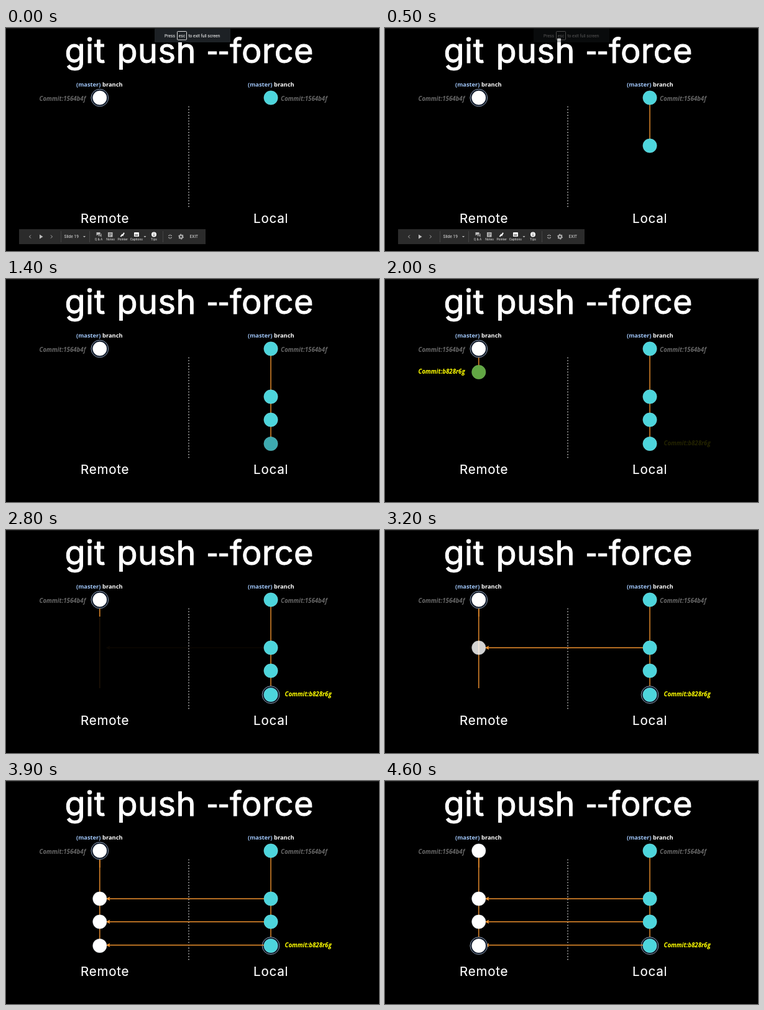
An HTML page for the animation above (4.8 s loop, 600x358 px).

```html
<!DOCTYPE html>
<html lang="en">
<head>
<meta charset="utf-8">
<title>git push --force</title>
<style>
  html, body { margin: 0; width: 100%; height: 100%; overflow: hidden; background: #000; }
  svg { display: block; width: 600px; height: 358px; }
  .title { font: 400 54px Inter, sans-serif; letter-spacing: .5px; fill: #fff; stroke: #fff; stroke-width: 1; stroke-linejoin: round; }
  .side { font: 400 20.5px Inter, sans-serif; letter-spacing: .8px; fill: #fff; stroke: #fff; stroke-width: .2; stroke-linejoin: round; }
  .branch { font: 700 9.3px "Open Sans", sans-serif; fill: #fff; }
  .commit { font: italic 700 9.7px "Open Sans", sans-serif; fill: #666; }
  .new { fill: #ff0; }
  .blue { fill: #9fc5f8; }
  .link { stroke: #f0922e; stroke-width: 1.4; fill: none; }
  .head { fill: #f0922e; }
  .local { fill: #4dd5dc; stroke: #8fdfe4; stroke-width: .4; }
  .remote { fill: #fff; stroke: #c8ccd2; stroke-width: .4; }
  .ring { fill: #0a1322; stroke: #8c9bb0; stroke-width: 1; }
  .tip { font: 6.7px Roboto, sans-serif; fill: #fff; }
  .bar { font: 6.6px Roboto, sans-serif; fill: #ddd; }
  .small { font-size: 5.1px; text-anchor: middle; }
  .icon { fill: #bbb; }
  .thin { fill: none; stroke: #aaa; stroke-width: 1; }
</style>
</head>
<body>
<svg viewBox="0 0 600 358">
  <defs>
    <circle id="dot" r="11.200"/>
    <circle id="halo" r="13.900" class="ring"/>
    <g id="arrow">
      <path class="link" d="M415 0H165"/>
      <path class="head" d="M160.500 0l7-3.200-1.500 3.200 1.500 3.200z"/>
    </g>
  </defs>
  <path d="M0 .5H600" stroke="#1c1c1c"/>

  <g class="title">
    <text x="94.500" y="56">git</text>
    <text x="178.500" y="56">push</text>
    <text x="322" y="56" font-family="Lato, sans-serif" letter-spacing="-2">--</text>
    <text x="360" y="56">force</text>
  </g>
  <g class="side">
    <text x="120" y="313">Remote</text>
    <text x="398" y="313">Local</text>
  </g>
  <g class="branch">
    <text x="113" y="93.500" class="blue">(master)</text><text x="155" y="93.500">branch</text>
    <text x="389" y="93.500" class="blue">(master)</text><text x="431" y="93.500">branch</text>
  </g>
  <g class="commit">
    <text x="53.500" y="117">Commit:1564b4f</text>
    <text x="442" y="117">Commit:1564b4f</text>
    <text x="53.500" y="152.300" class="new" data-in="1600 250" data-out="2450 250">Commit:b828r6g</text>
    <text x="448.500" y="267.300" class="new" data-in="1960 300">Commit:b828r6g</text>
  </g>
  <path d="M294 126.500V287" stroke="#ccc" stroke-width="1.700" stroke-linecap="round" stroke-dasharray="0 4.570"/>

  <!-- local history -->
  <g class="link">
    <path d="M426 123V178" data-in="50 250"/>
    <path d="M426 200V215" data-in="500 200"/>
    <path d="M426 237V254" data-in="1000 200"/>
  </g>
  <use href="#halo" x="426" y="264.500" data-in="2180 250"/>
  <g class="local">
    <use href="#dot" x="426" y="112"/>
    <use href="#dot" x="426" y="189" data-in="250 250"/>
    <use href="#dot" x="426" y="226" data-in="770 300"/>
    <use href="#dot" x="426" y="264.500" data-in="1200 250"/>
  </g>

  <!-- remote history -->
  <g class="link">
    <path d="M150.800 123V139" data-in="1400 200"/>
    <path d="M150.800 123V254" data-in="2770 220"/>
  </g>
  <use href="#arrow" y="189" data-in="2790 210"/>
  <use href="#arrow" y="226" data-in="3250 200"/>
  <use href="#arrow" y="263.500" data-in="3450 200"/>
  <use href="#halo" x="150.800" y="112" data-out="4250 250"/>
  <use href="#halo" x="150.800" y="264.500" data-in="4250 250"/>
  <use href="#dot" x="150.800" y="149.500" fill="#62a744" stroke="#83bd69" stroke-width=".4" data-in="1500 250" data-out="2450 250"/>
  <g class="remote">
    <use href="#dot" x="150.800" y="112"/>
    <use href="#dot" x="150.800" y="189" data-in="2960 290"/>
    <use href="#dot" x="150.800" y="226" data-in="3350 250"/>
    <use href="#dot" x="150.800" y="264.500" data-in="3620 250"/>
  </g>

  <!-- full screen hint -->
  <g class="tip" data-out="300 300">
    <rect x="239" y="1" width="122" height="22" rx="1" fill="#1d2125"/>
    <text x="255" y="14.500">Press</text>
    <rect x="275.500" y="5.500" width="15" height="13.500" rx="1" fill="none" stroke="#ddd"/>
    <text x="283" y="14.500" text-anchor="middle">esc</text>
    <text x="293.500" y="14.500">to exit full screen</text>
  </g>

  <!-- presenter toolbar -->
  <g class="bar" data-out="600 100">
    <rect x="21" y="323" width="300" height="24" fill="#2b2b2b"/>
    <path d="M88.500 326V344M134.500 326V344M252.500 326V344" stroke="#444"/>
    <path class="thin" d="M40 332.500l-2.500 2.500 2.500 2.500M72 332.500l2.500 2.500-2.500 2.500"/>
    <path class="icon" d="M54 331.500l5.500 3.500-5.500 3.500zM124 334h4l-2 2.200zM221.500 334h4l-2 2.200z"/>
    <text x="93.500" y="337.300">Slide 19</text>
    <path class="icon" d="M145.500 328h6v4h-4.500l-1.500 1.500zM152.500 330h1v5.500l-1.500-1.500h-4v-1h4.500z"/>
    <path class="icon" d="M164 328h7.500v7.500h-7.500z"/>
    <path d="M165.500 330h4.500M165.500 331.800h4.500M165.500 333.600h3" stroke="#2b2b2b" stroke-width=".7"/>
    <path d="M184.500 335l2.300-3 1 .8 2.200-4" fill="none" stroke="#fff" stroke-width="2"/>
    <rect x="206" y="328" width="8" height="7" rx="1" fill="#fff"/>
    <text x="210" y="333.500" class="small" style="fill:#222;font-weight:700">cc</text>
    <circle cx="238" cy="331.500" r="4" fill="#fff"/>
    <path d="M238 329v1M238 331v3" stroke="#222"/>
    <g class="small">
      <text x="149" y="341.200">Q &amp; A</text>
      <text x="168" y="341.200">Notes</text>
      <text x="187.500" y="341.200">Pointer</text>
      <text x="209.800" y="341.200">Captions</text>
      <text x="238" y="341.200">Tips</text>
    </g>
    <path class="thin" d="M261 333.500h2v-2M267 333.500h-2v-2M261 336.500h2v2M267 336.500h-2v2"/>
    <circle cx="281.500" cy="335" r="2.500" fill="none" stroke="#aaa" stroke-width="2"/>
    <circle cx="281.500" cy="335" r="3.800" fill="none" stroke="#aaa" stroke-width="1.200" stroke-dasharray="2 1.980"/>
    <text x="295.500" y="337.300">EXIT</text>
  </g>
</svg>
<script>
  const LOOP = 4800, STEP = 100, LAST = 4600;
  const parse = s => s && s.split(' ').map(Number);
  const ramp = (t, [start, length]) => Math.min(1, Math.max(0, (t - start) / length));

  const parts = [...document.querySelectorAll('[data-in], [data-out]')].map(el => ({
    el, show: parse(el.dataset.in), hide: parse(el.dataset.out)
  }));

  function draw(now) {
    const t = Math.min(LAST, Math.floor(now % LOOP / STEP) * STEP);
    for (const { el, show, hide } of parts) {
      const shown = show ? ramp(t, show) : 1;
      el.style.opacity = shown * (hide ? 1 - ramp(t, hide) : 1);
    }
  }

  const start = performance.now();
  function tick() {
    draw(performance.now() - start);
    requestAnimationFrame(tick);
  }
  tick();
</script>
</body>
</html>
```
